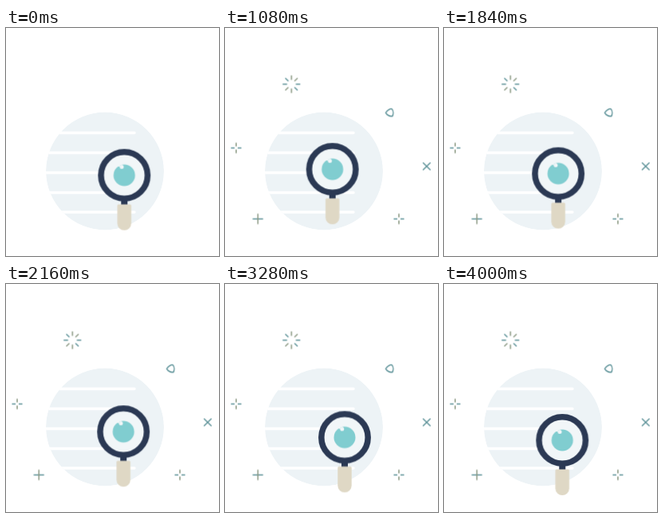
An HTML page without scripts for the animation above (4040 ms loop, 267 by 286 pixels).

```html
<!DOCTYPE html>
<html lang="en">
<head>
<meta charset="utf-8">
<title>Searching</title>
<style>
  html, body { margin: 0; width: 100%; height: 100%; overflow: hidden; background: #fff; }
  svg { display: block; width: 100vw; height: 100vh; }
  .lines { stroke: #fff; stroke-width: 3.4; stroke-linecap: round; }
  .marks { fill: none; stroke: #5d9298; stroke-width: 1.5; stroke-linecap: round; stroke-linejoin: round; }
  .warm { stroke: #8c9a84; }
  .pop { animation: pop 4040ms cubic-bezier(.2, .7, .3, 1) infinite; }
  .glass { animation: roam 4040ms linear infinite; }

  @keyframes pop {
    0% { transform: scale(0); opacity: 0; }
    8%, 100% { transform: scale(1); opacity: 1; }
  }
  @keyframes roam {
    0% { transform: translate(148.3px, 184.7px); }
    4% { transform: translate(147.6px, 184.4px); }
    8% { transform: translate(145.8px, 183.5px); }
    14.85% { transform: translate(141px, 181px); }
    20% { transform: translate(137.2px, 178.8px); }
    24% { transform: translate(135.2px, 177.5px); }
    28.2% { transform: translate(134.4px, 177.1px); }
    32% { transform: translate(135.3px, 177.7px); }
    37.62% { transform: translate(138.3px, 179.5px); }
    41.6% { transform: translate(140.8px, 181.1px); }
    47.5% { transform: translate(144.4px, 183.3px); }
    53.47% { transform: translate(147.2px, 185.3px); }
    58% { transform: translate(149px, 187px); }
    64% { transform: translate(150.7px, 188.8px); }
    69.31% { transform: translate(151.2px, 190px); }
    75% { transform: translate(150.8px, 191.2px); }
    81.19% { transform: translate(150px, 192.4px); }
    90% { transform: translate(149px, 194.4px); }
    99.01%, 100% { transform: translate(148.3px, 196px); }
  }
</style>
</head>
<body>
<svg viewBox="0 0 267 286" preserveAspectRatio="none">
  <defs>
    <clipPath id="disc"><circle cx="124" cy="179.5" r="74"/></clipPath>
  </defs>

  <g clip-path="url(#disc)">
    <circle cx="124" cy="179.5" r="74" fill="#edf3f6"/>
    <path class="lines" d="M45 131.5H161M45 156.5H161M45 181.5H130M45 206.5H161M45 231H161"/>
  </g>

  <g class="marks">
    <g transform="translate(83.3 70.5)"><g class="pop">
      <path d="M-10.5 0H-6M6 0H10.5M-7.3-7.3L-4.2-4.2M7.3 7.3L4.2 4.2"/>
      <path class="warm" d="M0-10.5V-6M0 6V10.5M7.3-7.3L4.2-4.2M-7.3 7.3L-4.2 4.2"/>
    </g></g>
    <g transform="translate(206.3 106.2)"><g class="pop">
      <path d="M-4.8 .2C-3.4-2.8 0-5 3-4.6C5-2 5 2 3.4 4.6C.4 4.8-3.4 3-4.8 .2Z"/>
    </g></g>
    <g transform="translate(14 150.5)"><g class="pop">
      <path d="M-6 0H-2.5M2.5 0H6"/>
      <path class="warm" d="M0-6V-2.5M0 2.5V6"/>
    </g></g>
    <g transform="translate(218 239.5)"><g class="pop">
      <path d="M-6 0H-2.5M2.5 0H6"/>
      <path class="warm" d="M0-6V-2.5M0 2.5V6"/>
    </g></g>
    <g transform="translate(41.2 239.5)"><g class="pop">
      <path d="M-6 0H6"/>
      <path class="warm" d="M0-6V6"/>
    </g></g>
    <g transform="translate(252.8 173.5)"><g class="pop">
      <path d="M-4.3-4.3L4.3 4.3M4.3-4.3L-4.3 4.3"/>
    </g></g>
  </g>

  <g class="glass">
    <rect x="-4" y="30" width="8" height="8" fill="#2b3954"/>
    <path d="M-7.5 36.5H7.5Q8.7 36.5 8.7 38V60.3A8.7 8.7 0 0 1-8.7 60.3V38Q-8.7 36.5-7.5 36.5Z" fill="#dfd8c5"/>
    <circle r="29.2" fill="#f1f6f8" stroke="#2b3954" stroke-width="7.5"/>
    <circle r="13.5" fill="#80cdd0"/>
    <circle cx="-3.2" cy="-10.6" r="2.5" fill="#f1f6f8"/>
    <circle cx="-6.5" cy="-12.2" r="1.5" fill="#f1f6f8"/>
  </g>
</svg>
</body>
</html>
```
